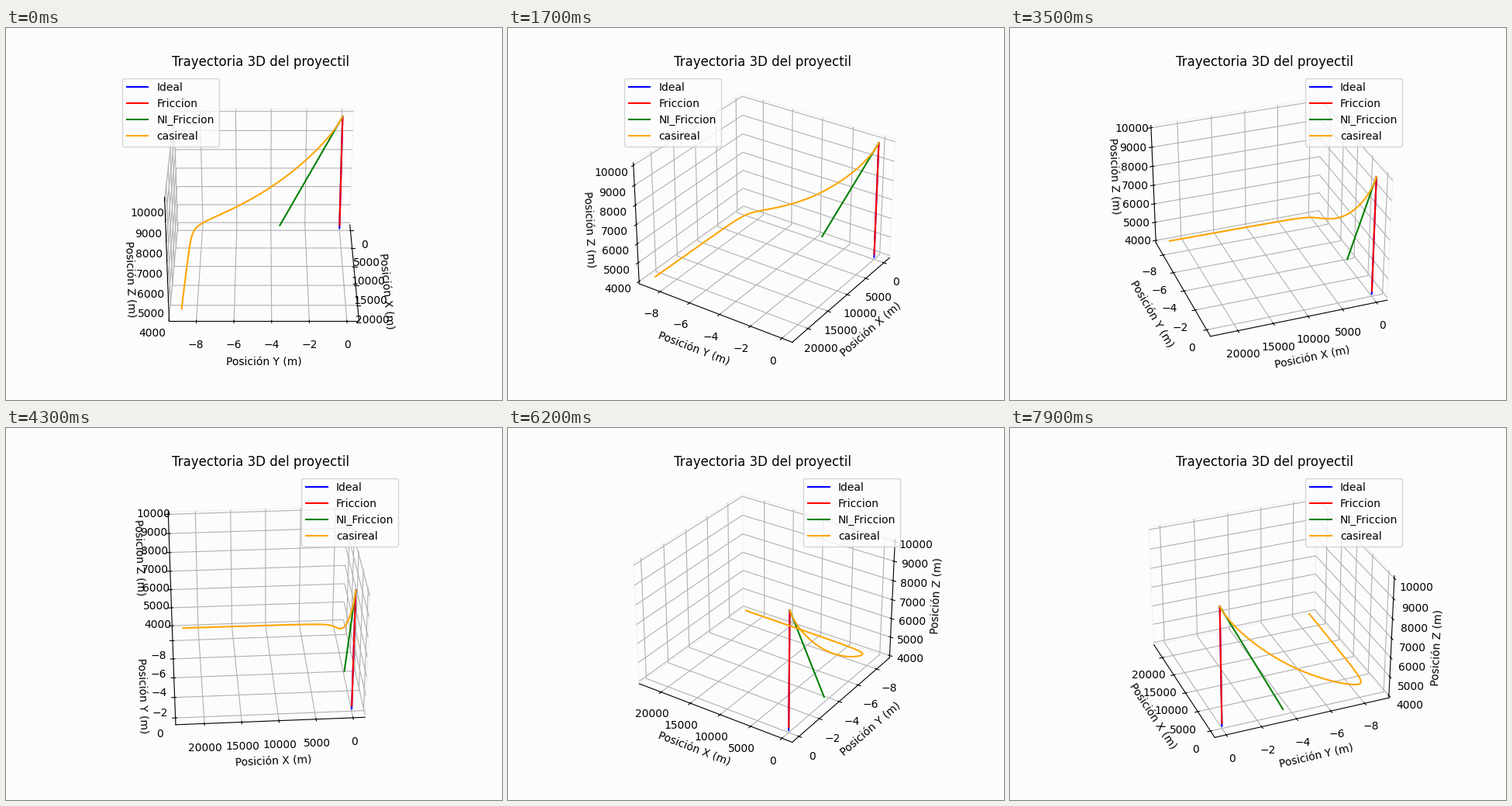
Write a matplotlib script that moves like this. It is 640x480 px and loops after 8 s.

```python
import numpy as np
import matplotlib.pyplot as plt
from matplotlib.animation import FuncAnimation

FRAMES = 80
STEP_MS = 100
DEG_PER_FRAME = 2
BG = "#fcfcfc"
TOP, BOTTOM = 10000, 4000
X_END = 22220

plt.rcParams.update({
    "font.family": "DejaVu Sans",
    "figure.facecolor": BG,
    "axes.facecolor": BG,
})


def straight(y, z):
    return [0, 0], [0, y], [TOP, z]


def curved(n=600):
    """Sideways drift that levels off while the range keeps growing."""
    x = X_END * np.linspace(0, 1, n) ** 8
    drift = 8.615 * (1 - np.exp(-(x / 52) ** 0.36)) + 8.5e-6 * x
    drop = 7480 * (1 - np.exp(-0.155 * drift)) + 270 * (1 - np.exp(-2.5 * drift))
    return x, -drift, TOP - drop


fig = plt.figure(figsize=(6.4, 4.8), dpi=100)
ax = fig.add_subplot(projection="3d")

ax.plot(*straight(0, BOTTOM), color="blue", label="Ideal")
ax.plot(*straight(0, 4160), color="red", label="Friccion")
ax.plot(*straight(-3.48, 4160), color="green", label="NI_Friccion")
ax.plot(*curved(), color="orange", label="casireal")

pad = (TOP - BOTTOM) / 48
ax.set_zlim(BOTTOM - pad, TOP + pad)
ax.set_title("Trayectoria 3D del proyectil")
ax.set_xlabel("Posición X (m)")
ax.set_ylabel("Posición Y (m)")
ax.set_zlabel("Posición Z (m)")
ax.legend(loc="best")

for axis in (ax.xaxis, ax.yaxis, ax.zaxis):
    axis.set_pane_color(BG)
    axis.pane.set_edgecolor("#f3f3f3")


def update(i):
    ax.view_init(elev=30, azim=DEG_PER_FRAME * i)
    return ax.lines


anim = FuncAnimation(fig, update, frames=FRAMES, interval=STEP_MS,
                     repeat=True, repeat_delay=0, blit=False)
plt.show()
```
